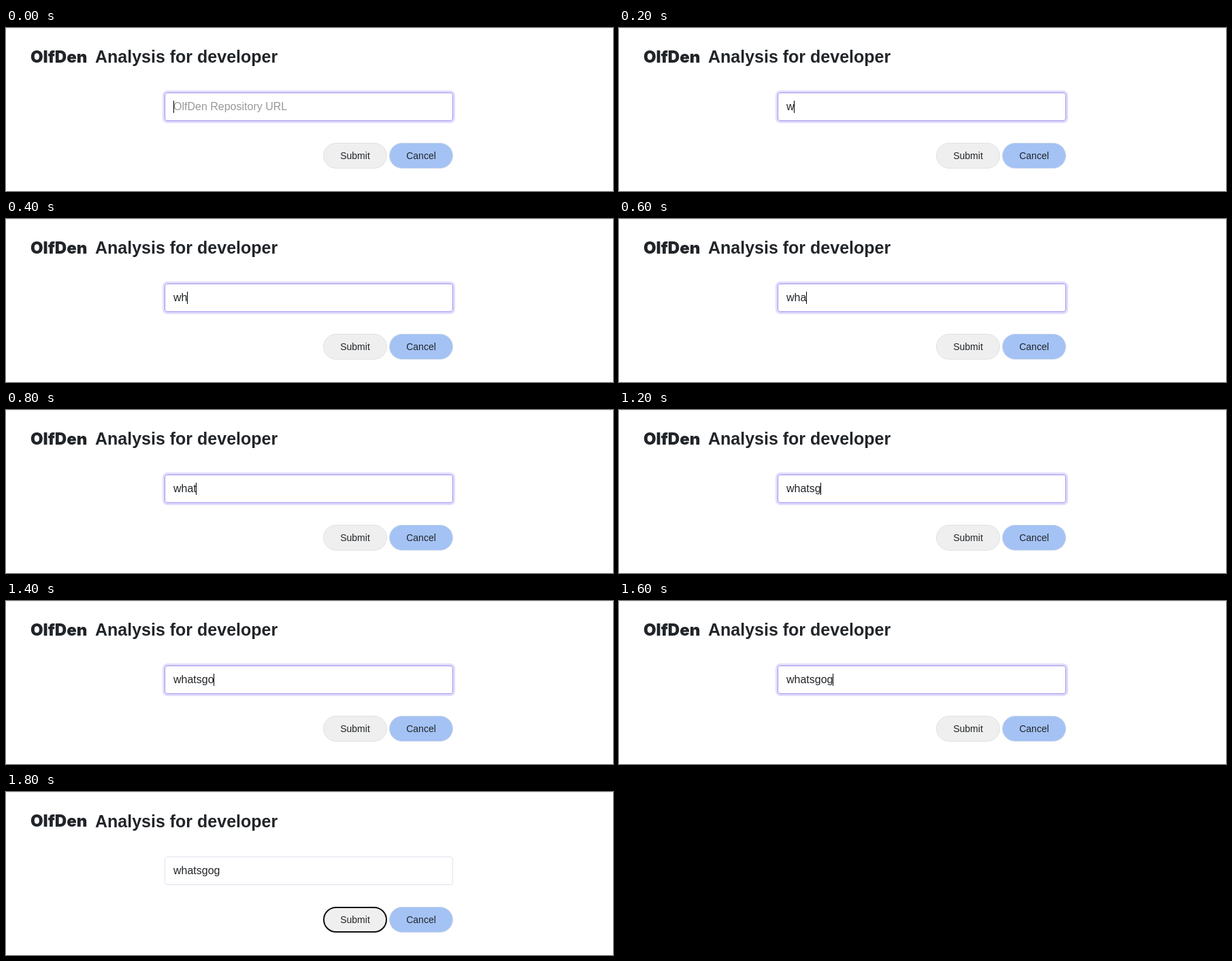
Animation, 892 px wide and 240 px high, one loop 2 s. Source, as an HTML page:

```html
<!DOCTYPE html>
<html lang="en">
<head>
<meta charset="utf-8">
<title>Repository analysis form</title>
<style>
  html, body {
    margin: 0;
    width: 100%;
    height: 100%;
    overflow: hidden;
    background: #fff;
  }
  body {
    position: relative;
    font-family: "Liberation Sans", Arial, sans-serif;
    color: #212529;
  }
  body * { box-sizing: border-box; }
  .rule, .brand, .title, .field, .btn { position: absolute; white-space: pre; }
  .rule { left: 0; top: 0; width: 100%; height: 1px; background: #f0f0f8; }
  .brand { left: 36px; top: 28px; font: 900 24px/29px Inter, sans-serif; }
  .title { left: 131px; top: 28px; font-size: 25px; font-weight: 700; line-height: 28px; }
  .field {
    left: 233px; top: 95px; width: 424px; height: 42px;
    padding: 11px 12px;
    border: 1px solid #e0e3ed;
    border-radius: 4px;
    font-size: 16px;
    line-height: 17px;
  }
  .hint { position: absolute; left: 12px; top: 11px; color: #999; }
  .caret {
    display: none;
    position: absolute;
    top: 11px;
    width: 1px; height: 18px;
    margin-left: -0.5px;
    background: #000;
  }
  .focus .field { border-color: #a08ff0; box-shadow: 0 0 0 3px #e2dcfb; }
  .focus .caret { display: inline-block; }
  .btn {
    display: flex; align-items: center; justify-content: center;
    top: 169px; width: 94px; height: 38px;
    border: 1px solid #dee2e6;
    border-radius: 19px;
    font-size: 14px;
    line-height: 16px;
  }
  .submit { left: 466px; background: #efefef; }
  .cancel { left: 563px; background: #a4c2f4; border-color: #ccd8ec; }
  .sent .submit { border: 2px solid #101010; }
  .sent .title { top: 29px; }
</style>
</head>
<body class="focus">
  <div class="rule"></div>
  <div class="brand">OlfDen</div>
  <div class="title">Analysis for developer</div>
  <div class="field"><span class="hint">OlfDen Repository URL</span><span class="typed"></span><span class="caret"></span></div>
  <div class="btn submit">Submit</div>
  <div class="btn cancel">Cancel</div>
<script>
  const TEXT = "whatsgog";
  const STEP = 200;
  const LOOP = 2000;
  const typed = document.querySelector(".typed");
  const hint = document.querySelector(".hint");
  let shown = -1;

  // One letter per step, then focus moves to the submit button.
  function draw(time) {
    const step = Math.floor((time % LOOP) / STEP);
    if (step === shown) return;
    shown = step;
    const sent = step > TEXT.length;
    typed.textContent = TEXT.slice(0, step);
    hint.hidden = step > 0;
    document.body.className = sent ? "sent" : "focus";
  }

  function tick() {
    draw(performance.now());
    requestAnimationFrame(tick);
  }
  tick();
</script>
</body>
</html>
```
